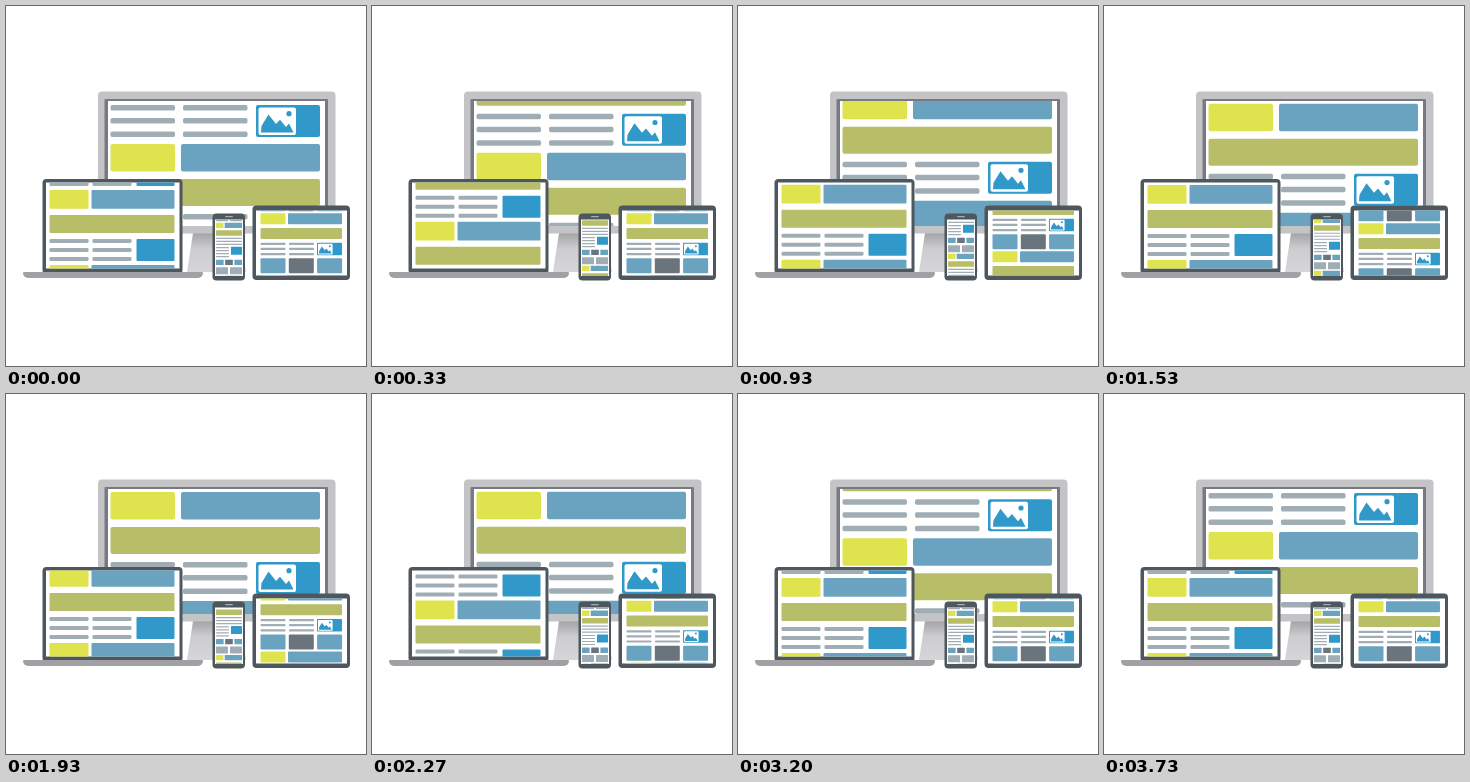
These frames come from a looping animation (360 by 360 pixels, 4070 ms). An HTML page with a canvas:

```html
<!DOCTYPE html>
<html lang="en">
<head>
<meta charset="utf-8">
<title>Responsive devices</title>
<style>
  html, body { margin: 0; width: 100%; height: 100%; overflow: hidden; background: #fff; }
  canvas { display: block; width: 360px; height: 360px; }
</style>
</head>
<body>
<canvas width="360" height="360"></canvas>
<script>
const ctx = document.querySelector('canvas').getContext('2d');
const LOOP = 4070, STEP = 200 / 3;
const YELLOW = '#dfe34d', BLUE = '#69a3c0', GREEN = '#b8be68', VIVID = '#3099ca',
      LINE = '#a1adb4', SLATE = '#69747c', DARK = '#4d575d', BEZEL = '#c4c4c7';

function box(color, x, y, w, h, r = 1) {
  ctx.fillStyle = color;
  ctx.beginPath();
  ctx.roundRect(x, y, w, h, r);
  ctx.fill();
}

function shape(color, ...points) {
  ctx.fillStyle = color;
  ctx.beginPath();
  points.forEach(([x, y]) => ctx.lineTo(x, y));
  ctx.fill();
}

function lines(x, w, h, ...tops) {
  tops.forEach(y => box(LINE, x, y, w, h, h / 3));
}

function picture(x, y, scale) {
  ctx.save();
  ctx.translate(x, y);
  ctx.scale(scale, scale);
  box(VIVID, 0, 0, 64, 32, 2);
  box('#fff', 2.5, 2.5, 37.5, 27.5, 2);
  shape(VIVID, [5, 27.5], [5.5, 21], [12.5, 9.5], [20, 19], [24, 14.7], [30, 22], [33, 18.5], [37.5, 27.5]);
  ctx.beginPath();
  ctx.arc(33, 8.7, 2.6, 0, 7);
  ctx.fill();
  ctx.restore();
}

// Each page is drawn from the top of its yellow/blue row.
function monitorPage() {
  box(YELLOW, 104.5, 0, 64.5, 27.5, 2);
  box(BLUE, 175, 0, 139, 27.5, 2);
  box(GREEN, 104.5, 35, 209.5, 27, 2);
  lines(104.5, 64.5, 5.5, 70, 83, 96.5);
  lines(177, 64.5, 5.5, 70, 83, 96.5);
  picture(250, 70, 1);
}

function laptopPage() {
  box(YELLOW, 43.5, 0, 39, 18.7);
  box(BLUE, 85.5, 0, 83, 18.7);
  box(GREEN, 43.5, 25, 125, 18);
  lines(43.5, 39, 4, 49, 58, 67);
  lines(86.5, 39, 4, 49, 58, 67);
  box(VIVID, 130.5, 49, 38, 22);
}

function tabletPage() {
  box(YELLOW, 254.5, 0, 25, 11);
  box(BLUE, 282, 0, 54, 11);
  box(GREEN, 254.5, 14.7, 81.5, 11);
  lines(254.5, 25, 2.2, 29.5, 34.5, 39.7);
  lines(283, 25, 2.2, 29.5, 34.5, 39.7);
  picture(311, 29.5, .39);
  [BLUE, SLATE, BLUE].forEach((c, i) => box(c, 254.5 + i * 28.3, 45, 25, 15));
}

function phonePage() {
  box(YELLOW, 210, 0, 7.5, 5.3, .5);
  box(BLUE, 218.7, 0, 17.3, 5.3, .5);
  box(GREEN, 210, 7.5, 26, 5.5, .5);
  lines(210, 26, 1.2, 15, 18, 21);
  lines(210, 13, 1.2, 24.3, 27.3, 30.3, 33.3);
  box(VIVID, 225, 24, 11, 8, .5);
  [BLUE, SLATE, BLUE].forEach((c, i) => box(c, 210 + i * 9.2, 37, 7.6, 5.3, .5));
  box(LINE, 210, 44.5, 12, 7, .5);
  box(LINE, 224, 44.5, 12, 7, .5);
}

// Soft start, long settling tail.
const ease = x => (1 - Math.cos(Math.PI * (1 - (1 - x) ** 2))) / 2;
const progress = (t, start, duration) =>
  ease(Math.min(1, Math.max(0, (t - start) / duration)));

// Every page scrolls away by `travel` and later comes back.
const devices = {
  monitor: { screen: [102, 95, 217, 125], page: monitorPage, top: 138, period: 109,
             travel: 69, leave: 120, back: 2240, duration: 1720 },
  laptop:  { screen: [40, 176.5, 133.5, 86], page: laptopPage, top: 184, period: 75,
             travel: 70, leave: 20, back: 1830, duration: 1150 },
  tablet:  { screen: [250, 204.5, 91, 65], page: tabletPage, top: 207.3, period: 62,
             travel: -58, leave: 640, back: 1410, duration: 1150 },
  phone:   { screen: [209, 213.5, 28, 56.5], page: phonePage, top: 216.8, period: 53,
             travel: -78, leave: 190, back: 1320, duration: 1150 }
};

function drawScreen({ screen, page, top, period, travel, leave, back, duration }, t) {
  const shift = travel * (progress(t, leave, duration) - progress(t, back, duration));
  ctx.save();
  box('#fff', ...screen, 0);
  ctx.clip();
  ctx.translate(0, top + shift - 2 * period);
  for (let i = 0; i < 6; i++) {
    page();
    ctx.translate(0, period);
  }
  ctx.restore();
}

function drawMonitor(t) {
  const stand = ctx.createLinearGradient(0, 227, 0, 266);
  stand.addColorStop(0, '#a3a3a6');
  stand.addColorStop(.4, '#cdcdcf');
  stand.addColorStop(1, '#d6d6d8');
  shape(stand, [187, 227], [234, 227], [240, 266], [181, 266]);
  box(BEZEL, 92, 85.5, 237.5, 142, 4);
  box('#777a82', 98.5, 93, 223.5, 127, 1);
  drawScreen(devices.monitor, t);
}

function drawLaptop(t) {
  box(DARK, 36.5, 173, 140, 95, 4);
  drawScreen(devices.laptop, t);
  box('#a1a1a5', 17, 266, 180, 6, [1, 1, 5, 5]);
}

function drawTablet(t) {
  box(DARK, 246.5, 199.5, 97.5, 74.5, 4);
  drawScreen(devices.tablet, t);
}

function drawPhone(t) {
  box(DARK, 206.5, 207.5, 32.5, 67, 4);
  box(LINE, 219, 210, 8, 1.2, .6);
  drawScreen(devices.phone, t);
}

function frame() {
  const now = performance.now() % LOOP;
  // The picture advances at 15 steps a second and rests at the end of the loop.
  const t = now < 3726 ? Math.floor((now + 4) / STEP) * STEP : 0;
  box('#fff', 0, 0, 360, 360, 0);
  [drawMonitor, drawLaptop, drawPhone, drawTablet].forEach(draw => draw(t));
  requestAnimationFrame(frame);
}
frame();
</script>
</body>
</html>
```
